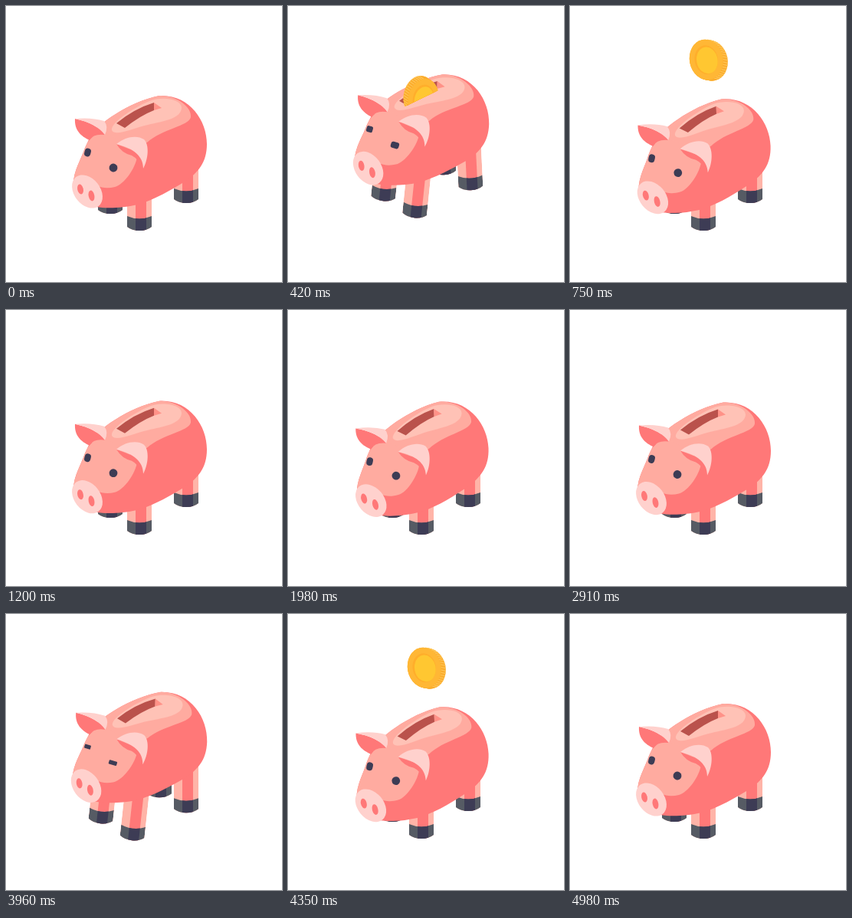
These frames come from a looping animation (360 px wide and 360 px high, 5010 ms). An HTML page with a canvas:

```html
<!DOCTYPE html>
<html lang="en">
<head>
<meta charset="utf-8">
<title>Piggy bank</title>
<style>
  html, body { margin: 0; width: 100%; height: 100%; overflow: hidden; background: #fff; }
  canvas { display: block; width: 360px; height: 360px; }
</style>
</head>
<body>
<canvas id="stage" width="360" height="360"></canvas>
<script>
const ctx = document.getElementById('stage').getContext('2d');
const LOOP = 5010, HOP = 1800;
const MAIN = '#ff7878', MID = '#ffaba0', LIGHT = '#ffc2b6', PALE = '#ffd1cd';
const DARK = '#3d3c55', HOOF = '#565b64', SLOT = '#ba524c';

const rad = deg => deg * Math.PI / 180;

function ease(from, to, t) {
  const u = Math.min(1, Math.max(0, (t - from) / (to - from)));
  return u * u * (3 - 2 * u);
}

// Rises from 0 to 1 at the peak, then returns to 0
const bump = (from, peak, to, t) => ease(from, peak, t) - ease(peak, to, t);

// Ballistic arc of height 1
function arc(from, to, t) {
  const u = (t - from) / (to - from);
  return Math.max(0, 4 * u * (1 - u));
}

function poseAt(t) {
  const frontKick = -9 * bump(250, 370, 690, t);
  const backKick = 19 * bump(370, 570, 700, t);
  return {
    dy: 4 * bump(0, 215, 310, t) - 35 * arc(310, 700, t)
      + 5.5 * bump(680, 730, 920, t) + 3.6 * bump(1040, 1095, 1300, t),
    tilt: -2.5 * bump(0, 200, 320, t) + 1.8 * bump(280, 380, 560, t) - 2.4 * bump(500, 700, 920, t),
    footDy: 3 * bump(270, 335, 420, t) - 32 * arc(370, 700, t),
    frontKick, backKick,
    open: 1 - .5 * bump(240, 360, 480, t)
  };
}

function fill(color, path) {
  ctx.fillStyle = color;
  ctx.fill(new Path2D(path));
}

function oval(color, x, y, rx, ry, deg = 0) {
  ctx.fillStyle = color;
  ctx.beginPath();
  ctx.ellipse(x, y, rx, ry, rad(deg), 0, 7);
  ctx.fill();
}

function bands(side, middle) {
  fill(side, 'M-16 -55H16V15H-16Z');
  fill(middle, 'M-5 -55H9V15H-5Z');
}

function leg(x, y, deg) {
  ctx.save();
  ctx.translate(x, y);
  ctx.rotate(rad(deg));
  ctx.clip(new Path2D('M-16 -55H16V5Q10 10 0 10Q-10 10 -16 5Z'));
  bands('#ffb4a8', MAIN);
  ctx.clip(new Path2D('M-16 -9Q0 -2 16 -9V12H-16Z'));
  bands(HOOF, DARK);
  ctx.restore();
}

function placeBody({ dy, tilt }) {
  ctx.translate(175, 190 + dy);
  ctx.rotate(rad(tilt));
  ctx.translate(-175, -190);
}

function eye(x, y, rx, ry, open) {
  ctx.save();
  ctx.translate(x, y);
  ctx.rotate(rad(15));
  ctx.fillStyle = DARK;
  ctx.beginPath();
  ctx.roundRect(-rx, -ry * open, 2 * rx, 2 * ry * open, Math.max(1, rx * (2 * open - 1)));
  ctx.fill();
  ctx.restore();
}

function body(pose) {
  ctx.save();
  placeBody(pose);
  // Trunk, back and face
  fill(MAIN, 'M110 170C118 155 160 125 200 117C239 115 262 149 262 180C262 205 250 217 235 228C215 240 195 252 172 259C150 264 130 264 118 262L88 232C88 215 98 200 103 185Z');
  fill(MID, 'M110 170C118 155 160 125 200 117C222 116 243 132 241 145C238 157 204 160 184 178L150 187L122 178Z');
  fill(MID, 'M103 185C108 172 116 167 126 167C142 168 160 182 171 197C169 211 154 233 142 236C134 238 126 238 118 234L88 232C88 215 98 200 103 185Z');
  // Coin slot
  fill(LIGHT, 'M138 162C136 152 170 130 190 123C206 118 229 122 229 133C228 147 206 150 185 155C167 159 142 171 138 162Z');
  fill(SLOT, 'M144 153Q167 134 193 126V136Q175 143 155 159Z');
  fill('#ff9288', 'M193 126L203 133L193 136Z');
  // Ears
  fill(MAIN, 'M90 147C89 162 98 170 109 175Q114 166 129 168Q118 153 90 147Z');
  fill(PALE, 'M90 147Q112 145 128 150Q134 157 129 168Q118 153 90 147Z');
  fill(MAIN, 'M144 180Q151 192 164 195Q172 199 179 212L175 192Z');
  fill(PALE, 'M144 180C156 170 171 168 180 174C187 181 186 199 179 212C179 196 167 186 144 180Z');
  // Snout and eyes
  oval(PALE, 106, 242, 17, 24, -38);
  oval(MAIN, 97, 239, 3.8, 6.6, -12);
  oval(MAIN, 111.5, 247.5, 3.8, 7, -12);
  eye(106.5, 191, 4.1, 5.4, pose.open);
  eye(140, 211, 5.4, 5.4, pose.open);
  ctx.restore();
}

function coin(t, pose) {
  if (t < 395 || t > 1065) return;
  const s = t - 600, rising = s < 0;
  const y = 60 + s * s * (rising ? .00185 : .00047);
  const x = rising ? 178 + s * .025 : 178 + 5 * Math.sin(s * .007) - s * .01;
  const turn = s * .0042;
  const rx = 27 * Math.max(.12, Math.abs(Math.cos(turn)));
  const depth = 5 * Math.sin(turn), drop = depth * .4;

  ctx.save();
  // Hide whatever has sunk behind the front lip of the slot
  ctx.save();
  placeBody(pose);
  ctx.beginPath();
  ctx.moveTo(100, -80);
  ctx.lineTo(300, -80);
  ctx.lineTo(300, 83);
  ctx.lineTo(100, 187);
  ctx.restore();
  ctx.clip();

  ctx.translate(x, y);
  ctx.rotate(rad(-18 * Math.sin(turn)));
  for (let k = 1; k >= -1; k -= .25) oval('#fbad2e', depth * k, drop * k, rx, 26.5);
  // Ridges along the visible edge
  ctx.strokeStyle = '#ffc85a';
  ctx.lineWidth = 1;
  for (let a = -1.3; a <= 1.3; a += .13) {
    const ex = Math.sign(depth) * rx * Math.cos(a), ey = 26.5 * Math.sin(a);
    ctx.beginPath();
    ctx.moveTo(ex - depth, ey - drop);
    ctx.lineTo(ex + depth, ey + drop);
    ctx.stroke();
  }
  ctx.translate(-depth, -drop);
  oval('#ffb735', 0, 0, rx, 26.5);
  oval('#ffae2b', 0, 0, rx * .7, 19);
  oval('#ffc731', 1, 1, rx * .63, 17.5);

  // Glint while the coin faces forward
  ctx.globalAlpha = Math.max(0, 1 - Math.abs(turn) / .4);
  ctx.beginPath();
  ctx.ellipse(0, 0, rx, 27, 0, 0, 7);
  ctx.clip();
  fill('#ffb144', 'M-40 -40H40V40H-40Z');
  fill('#ffc61f', 'M-40 11L40 -27V9L-40 45Z');
  ctx.restore();
}

function draw(now) {
  const t = now % LOOP % HOP, pose = poseAt(t);
  const { footDy, frontKick, backKick } = pose;
  ctx.fillStyle = '#fff';
  ctx.fillRect(0, 0, 360, 360);
  leg(200 + backKick, 227 + footDy, -.9 * backKick);
  leg(235 + backKick, 247 + footDy, -.9 * backKick);
  leg(136 + 1.35 * frontKick, 261 + footDy, -.7 * frontKick);
  leg(174 + frontKick, 283 + footDy, -.7 * frontKick);
  body(pose);
  coin(t, pose);
}

const start = performance.now();
function tick() {
  draw(performance.now() - start);
  requestAnimationFrame(tick);
}
tick();
</script>
</body>
</html>
```
